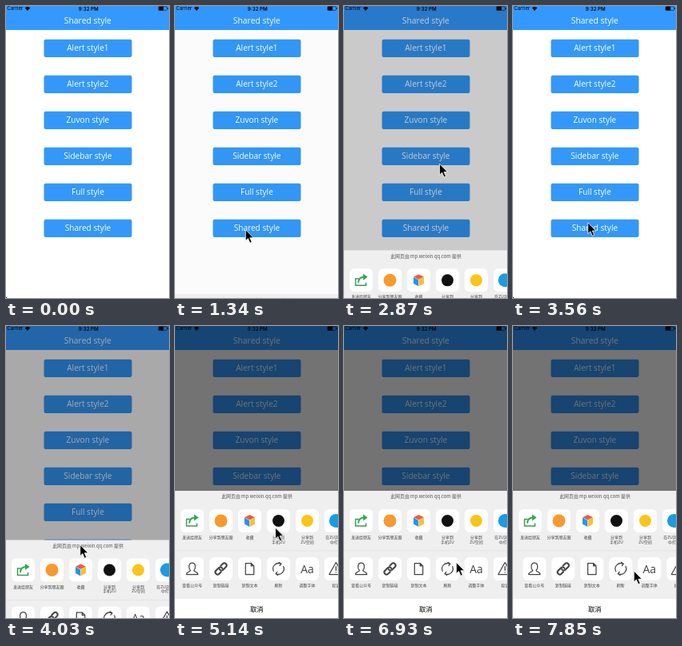
An HTML page that plays this animation: 204x365 px, repeating every 8 s.

```html
<!DOCTYPE html>
<html lang="en">
<head>
<meta charset="utf-8">
<title>Share sheet</title>
<style>
  html, body { margin: 0; width: 100%; height: 100%; overflow: hidden; background: #fff; }
  svg { display: block; width: 100%; height: 100%; }
  text { font-family: "Open Sans", "Noto Sans", sans-serif; text-anchor: middle; }
  .cjk text { font-family: "Noto Sans CJK SC", "Noto Sans CJK", sans-serif; }
  .status text { font: 6.2px Inter, sans-serif; }
  .label { font-size: 5px; fill: #444; }
  .cjk .latin { font: 14px "Open Sans", sans-serif; fill: #444; }
  .line { fill: none; stroke: #444; stroke-width: 1.25; stroke-linejoin: round; stroke-linecap: round; }
  .bold { stroke-width: 2; }
</style>
</head>
<body>
<svg viewBox="0 0 204 365" preserveAspectRatio="none">
  <rect width="204" height="365" fill="#fff"/>
  <rect width="204" height="30" fill="#3399ff"/>
  <text x="102.3" y="21.7" font-size="10.4" fill="#fff">Shared style</text>
  <g id="buttons" font-size="10.1" fill="#fff"></g>
  <path d="M0 363.5V365H1.5Z"/>
  <g class="status">
    <text x="1.2" y="5.4" style="text-anchor:start">Carrier</text>
    <path d="M23.8 2.2Q27 -.4 30.2 2.2L27 6Z"/>
    <text x="103.3" y="5.5" style="font-weight:600">9:32 PM</text>
    <rect x="191" y=".8" width="10.5" height="4.6" rx=".8" fill="none" stroke="#000" stroke-width=".5"/>
    <rect x="191" y=".8" width="6.2" height="4.6" rx=".6"/>
    <rect x="202" y="2.2" width=".8" height="1.8"/>
  </g>
  <rect id="dim" width="204" height="365"/>
  <g id="sheet" class="cjk">
    <rect y="206" width="204" height="160" fill="#efefef"/>
    <text x="102.5" y="215.4" font-size="5.9" fill="#555">此网页由 mp.weixin.qq.com 提供</text>
    <path d="M0 281H204" stroke="#dcdcdc" stroke-width=".6"/>
    <g id="row0"></g>
    <g id="row1"></g>
    <rect y="341" width="204" height="25" fill="#fff"/>
    <text x="102.3" y="356.8" font-size="8.3">取消</text>
  </g>
  <path id="cursor" d="M.3 .6V14.5L3.4 11.6L5.8 17.2L8.2 16.2L5.8 10.8H10.3Z" stroke="#fff" stroke-width=".8"/>
</svg>
<script>
const $ = id => document.getElementById(id);
const LOOP = 8000, LAG = 35, OVERFLOW = 20, DIM = 0.55, SHEET = 159;

const dot = (color, r) => `<circle r="${r}" fill="${color}"/>`;
const line = (d, extra = '') => `<path class="line ${extra}" d="${d}"/>`;

const rows = [
  { y: 243.5, items: [
    ['发送给朋友', `<path d="M-3-2H-7V6.5H6V3" fill="none" stroke="#3f9a58" stroke-width="1.5"/>
      <path d="M-3.5 3Q-3.5-3.5 3-4" fill="none" stroke="#2fa84f" stroke-width="2"/>
      <path d="M2.5-8L8-4L2.5 0Z" fill="#2fa84f"/>`],
    ['分享到朋友圈', dot('#f79a2e', 8)],
    ['收藏', `<g transform="scale(.93)"><path d="M0-8L7-4.6L0-1L-7-4.6Z" fill="#f4593e"/>
      <path d="M-7-4.2L-.3-.6V8L-7 4.4Z" fill="#2196f3"/><path d="M7-4.2L.3-.6V8L7 4.4Z" fill="#fbc02d"/></g>`],
    ['分享到|手机ZU', dot('#111', 7.5)],
    ['分享到|ZU空间', dot('#fcc419', 7.5)],
    ['在ZU浏览器|中打开', dot('#1c9be0', 8.5)]
  ] },
  { y: 303.5, items: [
    ['查看公众号', line('M-2.2 2C-5-1-4.5-7.5 0-7.5S5-1 2.2 2C2.2 4 7.2 3.5 7.2 7H-7.2C-7.2 3.5-2.2 4-2.2 2Z')],
    ['复制链接', `<g transform="rotate(-45)">${
      line('M-2.5 2.8H-6A2.8 2.8 0 0 1-6-2.8H-1A2.8 2.8 0 0 1 1.6 1', 'bold')}${
      line('M2.5-2.8H6A2.8 2.8 0 0 1 6 2.8H1A2.8 2.8 0 0 1-1.6-1', 'bold')}</g>`],
    ['复制文本', line('M-5.2-7H1.8L5.2-3.6V7H-5.2ZM1.8-7V-3.6H5.2')],
    ['刷新', line('M-6.2 3A7 7 0 0 1 3-6.3M6.2-3A7 7 0 0 1-3 6.3M.8-8L3.4-6.2L1.6-3.8M-.8 8L-3.4 6.2L-1.6 3.8')],
    ['调整字体', '<text class="latin" y="5">Aa</text>'],
    ['投诉', line('M0-8L8.5 7H-8.5ZM0-3V2M0 4.4V4.6')]
  ] }
];

const tile = (y, [label, icon], i) => `<g transform="translate(${21.5 + 36 * i} ${y})">
  <rect x="-14.5" y="-14.5" width="29" height="29" rx="6" fill="#fff"/>${icon}
  ${label.split('|').map((s, k) => `<text class="label" y="${22.6 + 5.8 * k}">${s}</text>`).join('')}</g>`;

rows.forEach((r, n) => {
  $('row' + n).innerHTML = r.items.map((item, i) => tile(r.y, item, i)).join('');
});

$('buttons').innerHTML = ['Alert style1', 'Alert style2', 'Zuvon style', 'Sidebar style', 'Full style', 'Shared style']
  .map((s, i) => `<g transform="translate(0 ${45 * i})">
    <rect x="47.5" y="41.8" width="110" height="22.2" rx="2.2" fill="#3398f9"/>
    <text x="102.4" y="55.7">${s}</text></g>`).join('');

// Cursor moves: start, end, x, y
const moves = [
  [330, 690, 66, 280], [840, 1040, 88, 279], [1950, 2450, 119.3, 196.6],
  [3110, 3620, 92.5, 273], [4390, 4900, 126, 251.5], [5110, 5600, 75, 254],
  [5750, 6230, 141, 262], [6600, 7110, 140, 308], [7130, 7480, 95, 311], [7480, 7850, 151, 305.5]
];

const clamp = v => Math.min(1, Math.max(0, v));
const ease = v => v * v * (3 - 2 * v);
const ramp = (t, a, b) => ease(clamp((t - a) / (b - a)));

function cursorAt(t) {
  let x = 192, y = 245;
  for (const [a, b, tx, ty] of moves) {
    const k = ramp(t, a, b);
    x += (tx - x) * k;
    y += (ty - y) * k;
  }
  return [x, y];
}

// Scroll offset with resistance past either end
function rubber(v) {
  if (v > 0) return v * 0.55;
  return v < -OVERFLOW ? -OVERFLOW + (v + OVERFLOW) * 0.55 : v;
}

function dragged(t, start, release) {
  if (t < start) return 0;
  const grab = cursorAt(start)[0];
  const shift = rubber(cursorAt(Math.min(t, release) - LAG)[0] - grab);
  return shift * (1 - clamp((t - release) / 350)) ** 3;
}

function draw(t) {
  const open = ramp(t, 1315, 1565) - ramp(t, 2725, 2975) + ramp(t, 3887, 4137);
  const [x, y] = cursorAt(t);
  $('dim').setAttribute('opacity', DIM * open);
  $('sheet').setAttribute('transform', `translate(0 ${SHEET * (1 - open)})`);
  $('row0').setAttribute('transform', `translate(${dragged(t, 5110, 6450)} 0)`);
  $('row1').setAttribute('transform', `translate(${dragged(t, 7130, LOOP)} 0)`);
  $('cursor').setAttribute('transform', `translate(${x} ${y})`);
  $('cursor').setAttribute('visibility', t < 360 ? 'hidden' : 'visible');
}

const t0 = performance.now();
function tick(now) {
  draw(Math.max(0, now - t0) % LOOP);
  requestAnimationFrame(tick);
}
draw(0);
requestAnimationFrame(tick);
</script>
</body>
</html>
```
